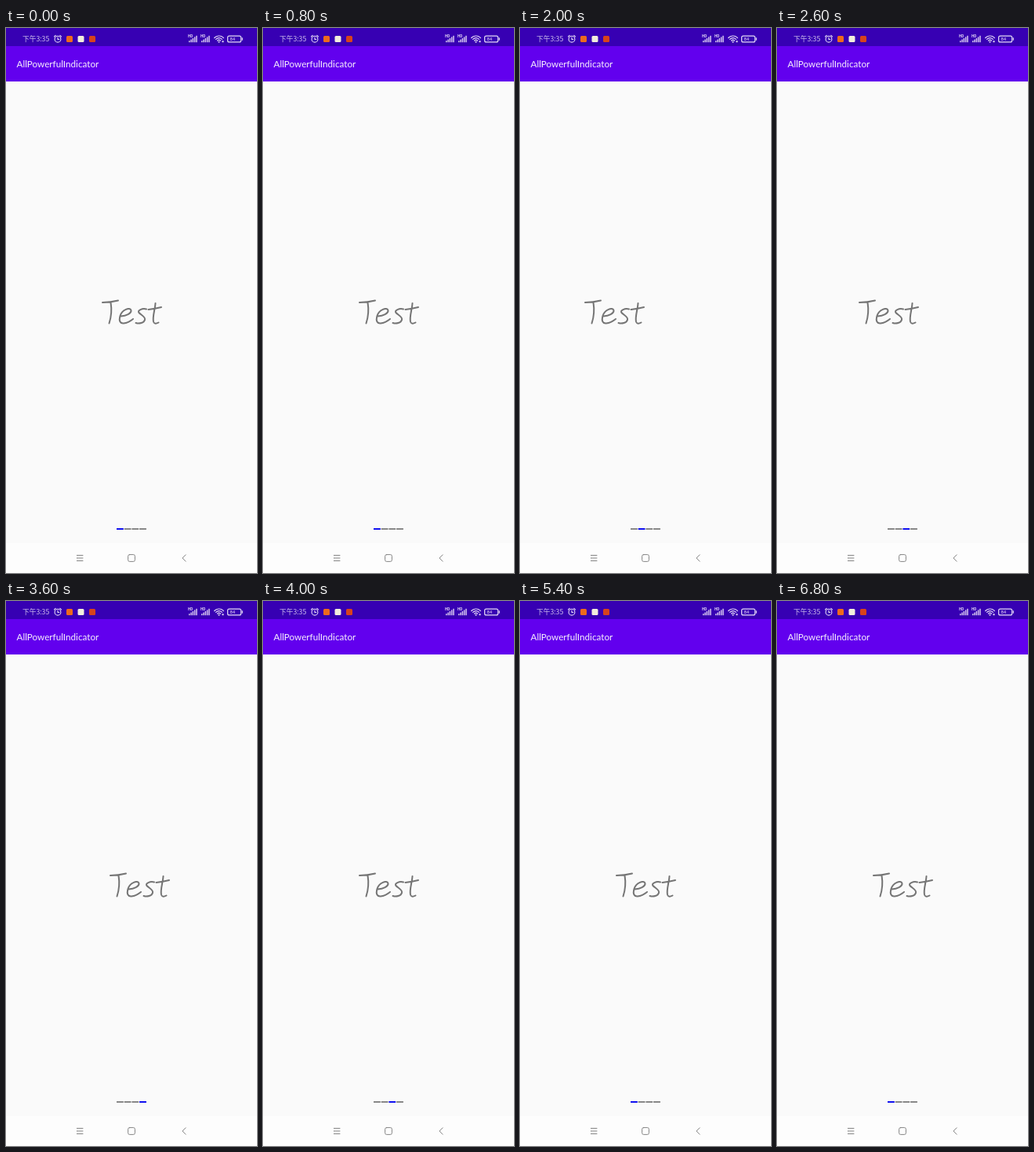
An HTML page with a canvas for the animation above (7.3 s loop, 320x693 px).

```html
<!DOCTYPE html>
<html lang="en">
<head>
<meta charset="utf-8">
<title>AllPowerfulIndicator</title>
<style>
html, body { margin: 0; width: 100%; height: 100%; overflow: hidden; background: #fafafa; }
canvas { display: block; width: 320px; height: 693px; }
</style>
</head>
<body>
<canvas id="stage" role="img" aria-label="Pages reading Test with a page indicator"></canvas>
<script>
const W = 320, H = 693, LOOP = 7300, STEP = 100;
const PALE = '#e4daf6';
const canvas = document.getElementById('stage');
const ctx = canvas.getContext('2d');
const dpr = window.devicePixelRatio || 1;
canvas.width = W * dpr;
canvas.height = H * dpr;

// Quick flings between pages; path holds the distance travelled at each step
const swipes = [
  { at: 1200, from: 0, to: 1, path: [194, 298, W] },
  { at: 1900, from: 1, to: 2, path: [4, 40, 160, 284, 313, W] },
  { at: 2600, from: 2, to: 3, path: [18, 120, 271, 310, W] },
  { at: 3600, from: 3, to: 2, path: [10, 150, 282, 312, W] },
  { at: 4300, from: 2, to: 1, path: [106, 262, 310, W] },
  { at: 4900, from: 1, to: 0, path: [36, 225, 296, 314, 319, W] }
];

function scrollAt(time) {
  const swipe = swipes.findLast(s => time >= s.at);
  if (!swipe) return 0;
  const { at, from, to, path } = swipe;
  const step = Math.min(Math.floor((time - at) / STEP), path.length - 1);
  return from * W + (to - from) * path[step];
}

function rect(x, y, w, h, color) {
  ctx.fillStyle = color;
  ctx.fillRect(x, y, w, h);
}

function box(x, y, w, h, r) {
  ctx.beginPath();
  ctx.roundRect(x, y, w, h, r);
}

function line(...pts) {
  ctx.beginPath();
  for (let i = 0; i < pts.length; i += 2) ctx.lineTo(pts[i], pts[i + 1]);
  ctx.stroke();
}

function pen(color, width) {
  ctx.strokeStyle = color;
  ctx.lineWidth = width;
  ctx.lineCap = ctx.lineJoin = 'round';
}

function text(str, x, y, font, color) {
  ctx.font = font;
  ctx.fillStyle = color;
  ctx.fillText(str, x, y);
}

// Handwritten "Test", centred on the page
const word = new Path2D([
  'M123 349Q133 349 143 346.5',
  'M133.5 349C135 358 134 368 131.5 375.5',
  'M146.5 366.5C153 366 160 363 159.5 359C158 354.5 148 358 145.5 366C143.5 373 146 376 150 375.5Q156 375 162 370',
  'M179 357.5C174 356 167 359 169.5 362C172 365 178 367 177 371C176 375 170 376.5 165.5 375',
  'M190.5 350C190 358 186.5 367 188 373.5Q189.5 377.5 194.5 374.5',
  'M181.5 358Q190 357 198 355'
].join(''));

function drawPage(dx) {
  ctx.save();
  ctx.translate(dx, 0);
  pen('#757575', 2);
  ctx.stroke(word);
  ctx.restore();
}

function drawSignal(x) {
  text('HD', x, 12.2, 'bold 4.5px Roboto, sans-serif', PALE);
  for (let i = 0; i < 5; i++) rect(x + 1 + i * 2.3, 16.2 - i * 1.6, 1.5, 2 + i * 1.6, '#d6c8ef');
}

function drawAlarm() {
  pen(PALE, 1.1);
  ctx.beginPath();
  ctx.arc(66, 14.2, 3.9, 0, Math.PI * 2);
  ctx.stroke();
  line(66, 12, 66, 14.5, 67.8, 14.5);
  line(61.5, 11, 63.2, 9.4);
  line(70.5, 11, 68.8, 9.4);
}

function drawWifi() {
  pen(PALE, 1.2);
  for (const r of [2.8, 5.4, 8]) {
    ctx.beginPath();
    ctx.arc(271.5, 18, r, -Math.PI * 0.76, -Math.PI * 0.24);
    ctx.stroke();
  }
  rect(270.6, 16.8, 1.8, 1.8, PALE);
  rect(275.5, 16.2, 2, 2, PALE);
}

function drawStatus() {
  rect(0, 0, W, 23, '#3700b3');
  text('下午3:35', 21, 17.2, '300 8.7px "Noto Sans CJK SC", "Noto Sans CJK", sans-serif', '#cfc0ec');
  drawAlarm();
  [[77, '#ee6a1c'], [91.5, '#f2eedc'], [106, '#d8431c']].forEach(([x, color]) => {
    ctx.fillStyle = color;
    box(x, 9.9, 8, 8, 1.5);
    ctx.fill();
  });
  drawSignal(232);
  drawSignal(248);
  drawWifi();

  pen(PALE, 1.2);
  box(282.6, 10.1, 17, 7.8, 2);
  ctx.stroke();
  rect(300.6, 12.3, 1.3, 3.4, PALE);
  text('84', 285.5, 16.2, '6px Roboto, sans-serif', PALE);
}

function drawNav() {
  rect(0, 655, W, H - 655, '#fdfdfd');
  pen('#858585', 1);
  for (const y of [670.5, 674, 677.5]) line(90, y, 98, y);
  box(155.6, 669.6, 8.8, 8.8, 2);
  ctx.stroke();
  line(229, 669.8, 225, 674, 229, 678.2);
}

function draw(time) {
  const x = scrollAt(time);
  const active = Math.round(x / W);
  ctx.setTransform(dpr, 0, 0, dpr, 0, 0);
  rect(0, 0, W, H, '#fafafa');
  for (let i = 0; i < 4; i++) {
    drawPage(i * W - x);
    rect(141 + i * 9.7, 636, 8.8, 2, i === active ? '#1010f0' : '#888888');
  }
  drawNav();
  rect(0, 23, W, 45, '#6200ee');
  text('AllPowerfulIndicator', 13.5, 49.5, '11.7px Lato, sans-serif', '#f8f2fc');
  drawStatus();
}

const begin = performance.now();
function tick() {
  draw((performance.now() - begin) % LOOP);
  requestAnimationFrame(tick);
}
tick();
</script>
</body>
</html>
```
